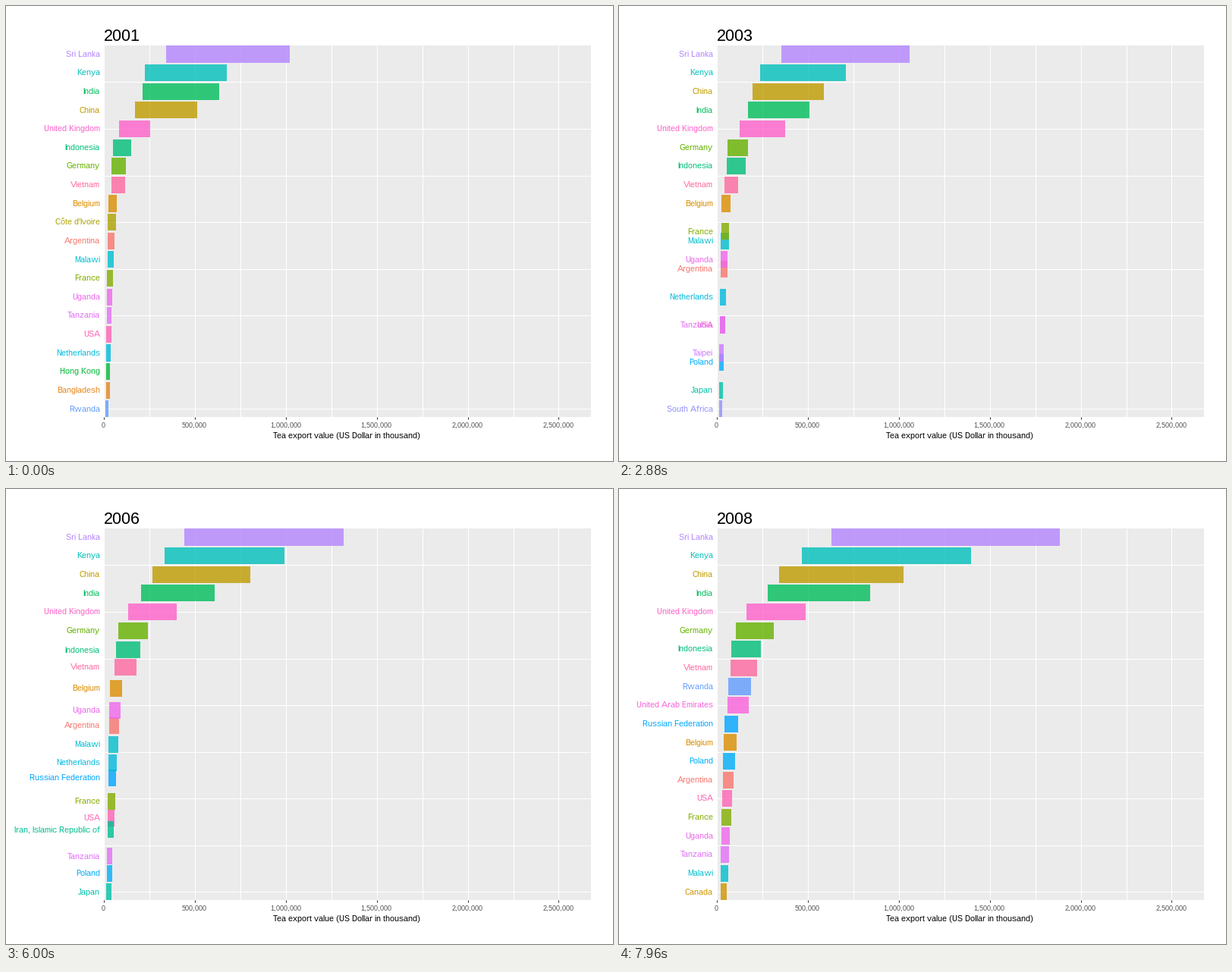
These frames come from a looping animation (800x600 px, 8000 ms). A matplotlib script:

```python
import math

import matplotlib.pyplot as plt
import numpy as np
from matplotlib.animation import FuncAnimation
from matplotlib.patches import Rectangle

# Whole-pixel glyph widths
plt.rcParams.update({
    "font.family": "Liberation Sans",
    "text.hinting": "native",
    "text.hinting_factor": 1,
})

# Alphabetical, as the hues follow this order; EG and GR never reach the top 20
NAMES = {
    "AR": "Argentina", "AZ": "Azerbaijan", "BD": "Bangladesh", "BE": "Belgium",
    "CA": "Canada", "CN": "China", "CI": "Côte d'Ivoire", "EG": "Egypt",
    "FR": "France", "DE": "Germany", "GR": "Greece", "HK": "Hong Kong",
    "IN": "India", "ID": "Indonesia", "IR": "Iran, Islamic Republic of",
    "JP": "Japan", "KE": "Kenya", "MW": "Malawi", "NL": "Netherlands",
    "PG": "Papua New Guinea", "PL": "Poland", "RU": "Russian Federation",
    "RW": "Rwanda", "ZA": "South Africa", "LK": "Sri Lanka", "TW": "Taipei",
    "TZ": "Tanzania", "UG": "Uganda", "AE": "United Arab Emirates",
    "GB": "United Kingdom", "US": "USA", "VN": "Vietnam", "ZW": "Zimbabwe",
}

# Drawing order, bottom to top
STACK = ("CN LK KE IN AE GB DE VN ID JP RU PL AR US NL MW BE FR UG RW TW TZ "
         "IR CI PG AZ ZA CA HK BD ZW EG GR").split()

# Turning points: years since 2001 and export value in million dollars
KEYS = {
    "LK": {0: 680, 1: 649, 2: 675, 5: 872, 6: 1016, 7: 1257},
    "KE": {0: 449, 1: 142, 2: 481, 3: 461, 5: 661, 6: 697, 7: 930},
    "CN": {0: 341, 1: 333, 2: 366, 7: 683},
    "IN": {0: 422, 1: 324, 2: 328, 6: 435, 7: 561},
    "GB": {0: 169, 2: 236, 3: 262, 4: 238, 7: 324},
    "DE": {0: 81, 7: 208},
    "ID": {0: 99, 2: 100, 5: 134, 6: 126, 7: 160},
    "VN": {0: 78, 1: 82, 2: 60, 3: 95, 7: 147},
    "AE": {4: 88, 6: 98, 7: 116},
    "RW": {0: 16, 1: 16, 4: 26, 7: 124},
}
LEADERS = "LK KE CN IN GB DE ID VN".split()

# Countries from rank 9 down, one row per year
FOLLOWERS = [row.split() for row in (
    "BE CI AR MW FR UG TZ US NL HK BD RW",
    "BE AR MW FR UG ZW TZ NL US HK BD RW",
    "BE FR UG MW AR NL US TZ TW PL JP ZA",
    "BE MW FR AR UG NL TZ US PL RU PG AZ",
    "AE BE MW AR FR NL UG US RU PL TZ RW",
    "BE UG AR MW NL RU FR US IR TZ PL JP",
    "AE IR BE RU AR MW NL UG US FR PL TZ",
    "RW AE RU BE PL AR US FR UG TZ MW CA",
)]

FRAMES, STEP = 200, 40
CYCLE, MOVE, LEAD = 28, 22, 5
X0, X_SCALE = 129.22, 0.2397
LEFT, RIGHT, TOP, BOTTOM = 129, 771, 52, 542
PITCH = (BOTTOM - TOP) / 19.9
BAR = 0.9 * PITCH


def px(size):
    """Pixels to points at 100 dpi."""
    return size * 0.72


def hcl(hue, chroma=100, light=65):
    """Polar LUV colour as sRGB."""
    h = math.radians(hue)
    y = ((light + 16) / 116) ** 3
    u = chroma * math.cos(h) / (13 * light) + 0.1978398
    v = chroma * math.sin(h) / (13 * light) + 0.4683363
    x = 9 * y * u / (4 * v)
    z = -x / 3 - 5 * y + 3 * y / v
    rgb = np.array([
        3.240479 * x - 1.537150 * y - 0.498535 * z,
        -0.969256 * x + 1.875992 * y + 0.041556 * z,
        0.055648 * x - 0.204043 * y + 1.057311 * z,
    ]).clip(0, 1)
    return tuple(np.where(rgb > 0.00304, 1.055 * rgb ** (1 / 2.4) - 0.055, 12.92 * rgb))


def value_of(code, year, rank=0):
    """Steady growth between turning points, or a decay by rank."""
    if code in KEYS:
        keys = KEYS[code]
        return math.exp(np.interp(year, list(keys), np.log(list(keys.values()))))
    return (43 + 42 * (year / 7) ** 2.5) * 0.92 ** (rank - 10)


def ranking(year):
    """Rank and value of the 20 largest exporters."""
    top = sorted(LEADERS, key=lambda code: -value_of(code, year))
    return {code: (rank, value_of(code, year, rank))
            for rank, code in enumerate(top + FOLLOWERS[year], 1)}


YEARS = [ranking(year) for year in range(len(FOLLOWERS))]


def x_at(value):
    return X0 + X_SCALE * value


def y_at(rank):
    return TOP + 0.4 + BAR / 2 + (rank - 1) * PITCH


def ease(p):
    return 4 * p ** 3 if p < 0.5 else 1 - 4 * (1 - p) ** 3


fig = plt.figure(figsize=(8, 6), dpi=100, facecolor="white")
ax = fig.add_axes([0, 0, 1, 1])
ax.set_xlim(0, 800)
ax.set_ylim(600, 0)
ax.axis("off")


def rule(xs, ys, color="white"):
    ax.plot(xs, ys, color=color, lw=px(1.07), zorder=1, solid_capstyle="butt")


ax.add_patch(Rectangle((LEFT, TOP), RIGHT - LEFT, BOTTOM - TOP, fc="#EBEBEB", lw=0, zorder=0))
for value in range(0, 2501, 250):
    x = x_at(value)
    rule([x, x], [TOP, BOTTOM])
    if value % 500 == 0:
        rule([x, x], [BOTTOM, BOTTOM + 3], "#333333")
        ax.text(x - 0.6, 556, f"{value * 1000:,}", size=px(9), color="#4D4D4D",
                ha="center", va="baseline")
for rank in np.arange(2.5, 20.1, 2.5):
    rule([LEFT, RIGHT], [y_at(rank)] * 2)

ax.text(449.5, 570, "Tea export value (US Dollar in thousand)", size=px(11),
        ha="center", va="baseline")
title = ax.text(128.5, 46, "", size=px(22), va="baseline")

bars, labels = {}, {}
for i, (code, name) in enumerate(NAMES.items()):
    color = hcl(15 + 360 * i / len(NAMES))
    depth = STACK.index(code) / 100
    bars[code] = ax.add_patch(Rectangle((0, 0), 1, BAR, fc=color, alpha=0.8, lw=0,
                                        zorder=2 + depth))
    labels[code] = ax.text(123.8, 0, name, size=px(11), color=color, ha="right",
                           va="baseline", zorder=3 + depth)


def scene(index, k):
    """Rank and value of every visible country."""
    if k >= MOVE:
        return YEARS[index]
    t = ease(k / MOVE)
    old, new = YEARS[index - 1], YEARS[index]
    out = {}
    for code, (r0, v0) in old.items():
        r1, v1 = new.get(code, (r0, v0))
        out[code] = (r0 + (r1 - r0) * t, v0 + (v1 - v0) * t)
    return out


def draw(frame):
    index, k = divmod(frame + CYCLE - LEAD, CYCLE)
    title.set_text(str(2001 + index - (k <= MOVE // 2)))
    shown = scene(index, k)
    for code, bar in bars.items():
        visible = code in shown
        bar.set_visible(visible)
        labels[code].set_visible(visible)
        if visible:
            rank, value = shown[code]
            y = y_at(rank)
            bar.set_xy((x_at(value / 2), y - BAR / 2))
            bar.set_width(value * X_SCALE)
            labels[code].set_y(y + 3.2)
    return [title, *bars.values(), *labels.values()]


anim = FuncAnimation(fig, draw, frames=FRAMES, interval=STEP, repeat=True, repeat_delay=0)
plt.show()
```
